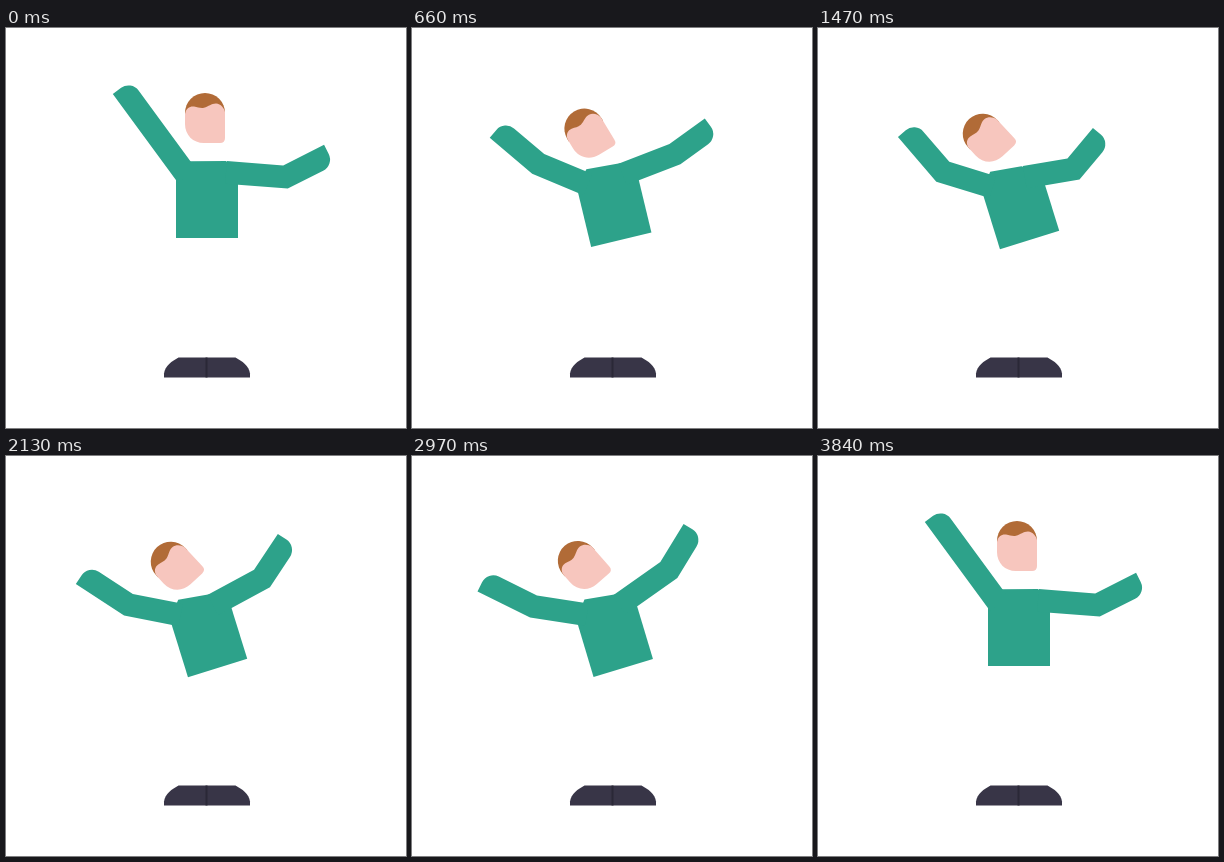
Recreate the animation shown at these times as an HTML page. Size 400 by 400 pixels, loop 5.87 s.

```html
<!DOCTYPE html>
<html lang="en">
<head>
<meta charset="utf-8">
<title>Dancing figure</title>
<style>
  html, body { margin: 0; width: 100%; height: 100%; overflow: hidden; background: #fff; }
  svg { display: block; width: 100vw; height: 100vh; }
</style>
</head>
<body>
<svg viewBox="0 0 400 400">
  <g fill="#383547">
    <path d="M158 349.5V345.5C159 338 166 333 172.500 329.500H201V349.500Z"/>
    <path d="M244 349.500V345.500C243 338 236 333 229.500 329.500H201V349.500Z"/>
    <path d="M200.500 329.500V349.500" stroke="#2a2837" stroke-width="2"/>
  </g>
  <g id="body">
    <g id="head">
      <path fill="#b16b37" d="M179 88V85A20 20 0 0 1 219 85V88Z"/>
      <path fill="#f7c6be" d="M179 86C180 80 184 78 188 78.500C192 79 194 80.500 198 79.800C203 78.500 205 75.500 210 75.500C215 76 218 80 219 84V110Q219 115 214 115H198C187 115 179 107 179 96Z"/>
    </g>
    <g fill="#2da28a">
      <path id="torso"/>
      <path id="armL"/>
      <path id="armR"/>
    </g>
  </g>
</svg>
<script>
  const LOOP = 5870, ACTIVE = 3840, STEP = 30;
  const HALF = 11.4, ROUND = 12.5;
  const LEAN = 17.2, MOVE = 523, UP = 398, DOWN = 2948, WAVE = 1014;

  // Joint positions relative to the upright torso; low and high are the wave's ends.
  const joints = {
    elbowL: { rest: [149.2, 104.5], mid: [138, 116.7], low: [132.7, 125.3], high: [138.4, 119] },
    handL: { rest: [116, 59.2], mid: [106.2, 73.2], low: [90.9, 86.7], high: [116.6, 67.8] },
    shoulderR: { rest: [220, 144.3], mid: [217.5, 146.5], low: [215, 148.5], high: [215, 148.5] },
    elbowR: { rest: [279.5, 149], mid: [273.2, 139.3], low: [272.8, 129.1], high: [263.8, 155.5] },
    handR: { rest: [323.2, 127], mid: [315, 122], low: [307.7, 97.4], high: [300.7, 131.8] }
  };
  const shoulderL = [181.5, 148.5];
  const tiltKeys = [[0, 0], [280, 4], [803, -LEAN], [2917, -LEAN], [3440, 4], [ACTIVE, 0]];

  const $ = id => document.getElementById(id);
  const clamp = x => Math.min(1, Math.max(0, x));
  const ease = x => (1 - Math.cos(Math.PI * clamp(x))) / 2;
  const add = (p, v, k) => [p[0] + v[0] * k, p[1] + v[1] * k];
  const fmt = p => p.map(n => n.toFixed(2)).join(' ');

  function tiltAt(t) {
    for (let i = 1; i < tiltKeys.length; i++) {
      const [t0, a] = tiltKeys[i - 1], [t1, b] = tiltKeys[i];
      if (t <= t1) return a + (b - a) * ease((t - t0) / (t1 - t0));
    }
    return 0;
  }

  // Curve from rest through mid to the wave pose.
  function place(joint, raise, wave) {
    return [0, 1].map(i => {
      const end = joint.low[i] + (joint.high[i] - joint.low[i]) * wave;
      return joint.rest[i] * (1 - raise) * (1 - 2 * raise)
        + joint.mid[i] * 4 * raise * (1 - raise)
        + end * raise * (2 * raise - 1);
    });
  }

  function unit(a, b) {
    const x = b[0] - a[0], y = b[1] - a[1], d = Math.hypot(x, y);
    return [x / d, y / d];
  }

  // Mitred sleeve with one rounded corner at the hand.
  function sleeve(shoulder, elbow, hand) {
    const u = unit(shoulder, elbow), v = unit(elbow, hand);
    const n = [u[1], -u[0]], m = [v[1], -v[0]];
    const k = HALF / (1 + n[0] * m[0] + n[1] * m[1]);
    const joint = [n[0] + m[0], n[1] + m[1]];
    const bend = add(hand, m, ROUND - HALF);
    const under = add(add(hand, v, -ROUND), m, -HALF);
    return `M${fmt(add(shoulder, n, HALF))}L${fmt(add(elbow, joint, k))}`
      + `L${fmt(add(hand, m, HALF))}L${fmt(bend)}`
      + `A${ROUND} ${ROUND} 0 0 1 ${fmt(under)}`
      + `L${fmt(add(elbow, joint, -k))}L${fmt(add(shoulder, n, -HALF))}Z`;
  }

  function draw(t) {
    const tilt = tiltAt(t);
    const raise = ease((t - UP) / MOVE) - ease((t - DOWN) / MOVE);
    const phase = (t - UP - MOVE) / WAVE;
    const wave = phase > 0 && phase < 2 ? (1 - Math.cos(2 * Math.PI * phase)) / 2 : 0;
    const at = name => place(joints[name], raise, wave);

    const nod = Math.sign(tilt) * 25.8 * Math.pow(Math.abs(tilt) / LEAN, 1.6);
    const s = clamp(-tilt / 5.5);
    const dip = 7 * s * s * (3 - 2 * s);
    const sh = at('shoulderR');

    $('body').setAttribute('transform', `rotate(${tilt} 213 176)`);
    $('head').setAttribute('transform', `translate(0 ${dip}) rotate(${nod} 199 111)`);
    $('torso').setAttribute('d',
      `M170 210H232V${sh[1] + 1}L${fmt([sh[0], sh[1] - HALF])}L183.500 133.200L170 150Z`);
    $('armL').setAttribute('d', sleeve(shoulderL, at('elbowL'), at('handL')));
    $('armR').setAttribute('d', sleeve(sh, at('elbowR'), at('handR')));
  }

  const start = performance.now();
  function tick() {
    const t = (performance.now() - start) % LOOP;
    draw(Math.min(ACTIVE, Math.floor(t / STEP) * STEP));
    requestAnimationFrame(tick);
  }
  tick();
</script>
</body>
</html>
```
